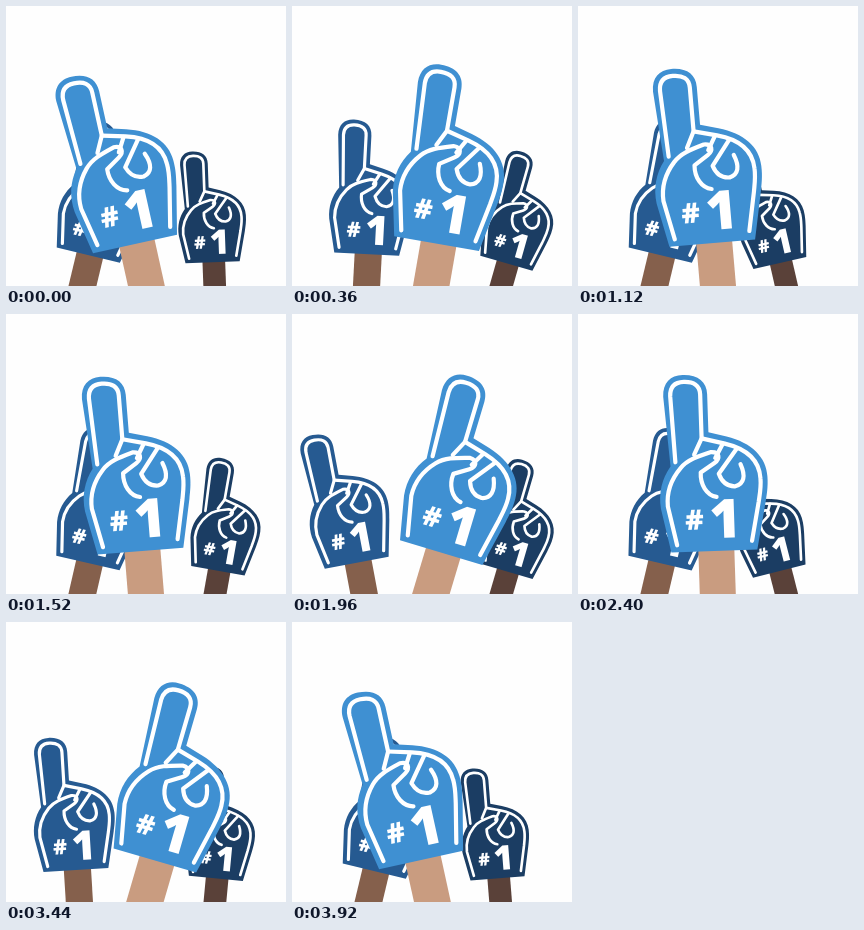
Recreate the animation shown at these times as an HTML page. Size 280 by 280 pixels, loop 3.96 s.

```html
<!DOCTYPE html>
<html lang="en">
<head>
<meta charset="utf-8">
<title>Foam fingers</title>
<style>
html, body { margin: 0; width: 100%; height: 100%; overflow: hidden; background: #fefefe; }
svg { display: block; width: 100vw; height: 100vh; }
.line { fill: none; stroke: #fff; stroke-width: 4.2; stroke-linecap: round; stroke-linejoin: round; }
text { fill: #fff; font-family: "Open Sans", sans-serif; font-weight: 800; text-anchor: middle; }
</style>
</head>
<body>
<svg viewBox="0 0 280 280">
  <defs>
    <!-- upright hand, origin in the middle of its lower edge -->
    <g id="foam">
      <path d="M-43 0 L-52 -44 C-54 -60 -50 -74 -41 -86 L-46 -156 C-46 -170 -38 -177 -26 -177 C-11 -177 -2 -170 -2 -157 L-2 -119 L16 -114 C41 -107 55 -92 55.500 -73 C56 -62 54 -54 53 -48 L43 0 Z"/>
      <g class="line">
        <path d="M-36 -90 L-39 -156 C-39 -166 -34 -170 -25 -170 C-15 -170 -9 -166 -9 -157 L-9 -113 L-17 -97"/>
        <path d="M-9 -113 L14 -107 C36 -101 48 -89 48.500 -71 C49 -62 47 -54 46 -48 L38 -9"/>
        <path d="M-37 -7 L-45 -46 C-46 -62 -40 -74 -31 -84 C-24 -92 -14 -95 0 -99 C9 -99 9 -92 3 -88 L-11 -79 C-12 -67 -6 -56 4 -54"/>
        <path d="M12 -107 L4 -93"/>
        <path d="M26 -102 L7 -77 C10 -68 16 -64 23 -64 C32 -66 34 -74 29 -86"/>
      </g>
      <text x="-19" y="-22" font-size="28">#</text>
      <text x="12" y="-13" font-size="54">1</text>
    </g>
  </defs>
  <g id="stage"></g>
</svg>
<script>
const LOOP = 3960, SWING = 1320, STEP = 40;

// x, y: pivot; arm: distance from pivot to hand, in hand units
// low: lean at the left end, high: at the right end
// rise and fall: start and end of each move within one swing
const hands = [
  { x: 207.5, y: 281.5, arm: 40, size: .63, foam: '#1b3d63', skin: '#5a4139',
    low: -16, high: 16.3, rise: [975, 1735], fall: [640, 1050] },
  { x: 72.5, y: 290, arm: 55.6, size: .755, foam: '#265a91', skin: '#85604c',
    low: -10.8, high: 13.5, rise: [620, 1115], fall: [160, 600] },
  { x: 137.7, y: 277, arm: 40, size: 1, foam: '#3f90d2', skin: '#c99c80',
    low: -12.5, high: 16.7, rise: [42, 506], fall: [760, 1300] }
];

const stage = document.getElementById('stage');

for (const h of hands) {
  h.node = document.createElementNS('http://www.w3.org/2000/svg', 'g');
  h.node.innerHTML =
    `<path d="M-16 -10 H20 V100 H-16 Z" fill="${h.skin}"/>` +
    `<use href="#foam" fill="${h.foam}"/>`;
  stage.append(h.node);
}

function ease(t, [from, to]) {
  const u = Math.min(1, Math.max(0, (t - from) / (to - from)));
  return u * u * (3 - 2 * u);
}

function lean(h, time) {
  const first = Math.min(h.rise[0], h.fall[0]);
  const t = first + ((time - first) % SWING + SWING) % SWING;
  const up = ease(t, h.rise), down = ease(t, h.fall);
  const k = h.rise[0] < h.fall[0] ? up - down : 1 - down + up;
  return h.low + (h.high - h.low) * k;
}

function draw(time) {
  for (const h of hands) {
    h.node.setAttribute('transform',
      `translate(${h.x} ${h.y}) rotate(${lean(h, time)}) scale(${h.size}) translate(0 ${-h.arm})`);
  }
}

let start;
function tick(now) {
  start ??= now;
  const t = (now - start) % LOOP;
  draw(Math.floor(t / STEP) * STEP);
  requestAnimationFrame(tick);
}
draw(0);
requestAnimationFrame(tick);
</script>
</body>
</html>
```
